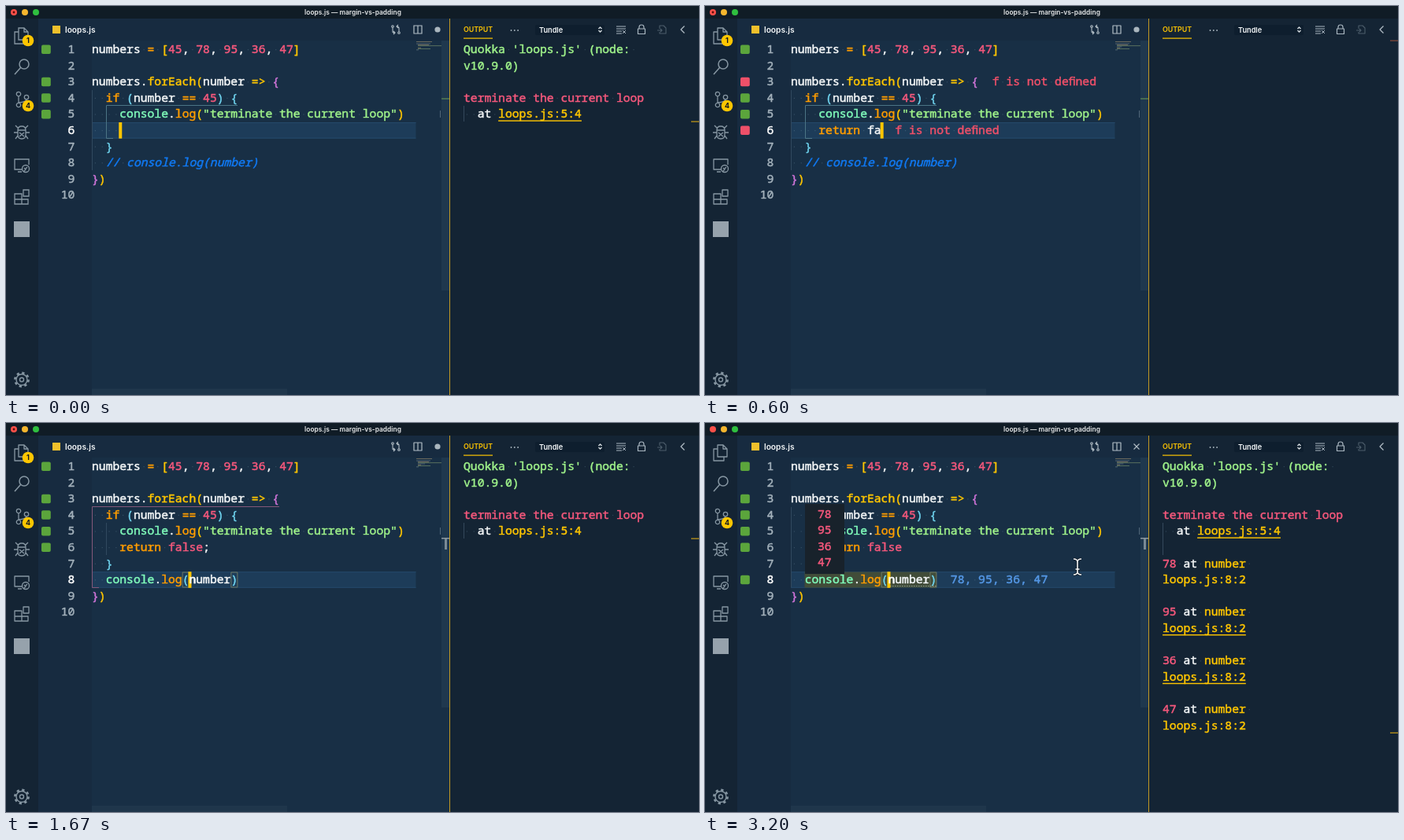
An HTML page with a canvas for the animation above (3.3 s loop, 880 px wide and 495 px high).

```html
<!DOCTYPE html>
<html lang="en">
<head>
<meta charset="utf-8">
<title>Editor session</title>
<style>
html, body { margin: 0; width: 100%; height: 100%; overflow: hidden; background: #142434; }
canvas { display: block; width: 880px; height: 495px; }
</style>
</head>
<body>
<canvas id="stage" width="880" height="495"></canvas>
<script>
const ctx = document.getElementById('stage').getContext('2d');
const LOOP = 3300, ADV = 8.82, ROW = 20.6, CODE_X = 109, OUT_X = 581;
const MONO = '"Noto Sans Mono", "DejaVu Sans Mono", monospace', SANS = 'Inter, Roboto, sans-serif';
const C = {
  w: '#f4f7f8', y: '#ffc600', o: '#ff9d00', p: '#f5587c', g: '#9ff28a', m: '#80fcbb',
  c: '#6fd3ee', v: '#cf74d8', b: '#1079f2', i: '#5598e6', e: '#ee5069',
  icon: '#8797a3', green: '#5ba53c', editor: '#182f45', panel: '#142434', popup: '#17222c'
};
const rowY = n => 55 + ROW * (n - 1);
const colX = n => CODE_X + ADV * n;

function rect(x, y, w, h, color) {
  ctx.fillStyle = color;
  ctx.fillRect(x, y, w, h);
}
function round(x, y, w, h, r, color) {
  ctx.fillStyle = color;
  ctx.beginPath();
  ctx.roundRect(x, y, w, h, r);
  ctx.fill();
}
function disc(x, y, r, color) {
  round(x - r, y - r, 2 * r, 2 * r, r, color);
}
function text(s, x, y, color, font, align = 'left') {
  ctx.font = font;
  ctx.textAlign = align;
  ctx.textBaseline = 'alphabetic';
  ctx.fillStyle = color;
  ctx.fillText(s, x, y);
}
// Monospaced text with a fine outline for a semibold weight.
function mono(s, x, y, color, { size = 14.7, style = '', align = 'left', weight = .5 } = {}) {
  text(s, x, y, color, `${style} 500 ${size}px ${MONO}`, align);
  ctx.strokeStyle = color;
  ctx.lineWidth = weight;
  ctx.lineJoin = 'round';
  ctx.strokeText(s, x, y);
}
function stroke(x, y, path, color = C.icon, width = 1.3, dash = []) {
  ctx.save();
  ctx.translate(x, y);
  ctx.strokeStyle = color;
  ctx.lineWidth = width;
  ctx.setLineDash(dash);
  ctx.stroke(new Path2D(path));
  ctx.restore();
}
const ring = (x, y, r) => `M${x + r} ${y}a${r} ${r} 0 1 1 ${-2 * r} 0a${r} ${r} 0 1 1 ${2 * r} 0`;

// Draws [colour key, text, ...] on the character grid, with faint dots for spaces.
function code(x, y, parts, style = '') {
  for (let k = 0; k < parts.length; k += 2) {
    const s = parts[k + 1];
    mono(s, x, y + 5, C[parts[k]], { style });
    [...s].forEach((ch, n) => {
      if (ch === ' ') rect(x + (n + .5) * ADV - .6, y, 1.2, 1.2, 'rgba(150,185,205,.22)');
    });
    x += s.length * ADV;
  }
}
const line = (row, parts, style) => code(CODE_X, rowY(row), parts, style);

// Line 6 as it is typed.
const TYPED = [[0, ''], [70, 'r'], [270, 're'], [330, 'ret'], [400, 'retur'], [470, 'return'],
  [530, 'return f'], [600, 'return fa'], [670, 'return fal'], [730, 'return fals'],
  [800, 'return false'], [1130, 'return false;'], [1870, 'return false']];

function stateAt(t) {
  const typed = TYPED.findLast(([start]) => t >= start)[1];
  const row = t < 1200 ? 6 : t < 1270 ? 7 : 8;
  return {
    t, typed, row,
    col: row === 6 ? 4 + typed.length : row === 7 ? 3 : t < 1670 ? 17 : 14,
    error: t < 200 ? '' : t < 470 ? 'r' : t < 530 ? '' : t < 930 ? 'f' : '',
    uncommented: t >= 1670,
    saved: t >= 1870,
    values: Math.max(0, Math.min(4, Math.floor((t - 1865) / 66))),
    outer: t >= 1330,
    hover: t >= 2930
  };
}

function drawChrome(s) {
  rect(0, 0, 880, 495, C.panel);
  rect(41, 16, 522, 479, '#172b40');
  rect(109, 44, 454, 451, C.editor);
  rect(0, 0, 880, 16, '#101c26');
  ['#fb5049', '#f5b62e', '#2fbf3f'].forEach((c, k) => disc(10 + 14 * k, 8, 4, c));
  if (!s.saved) disc(10, 8, 1.4, '#5c0d0a');
  text('loops.js — margin-vs-padding', 440.5, 11.2, '#e6e8e9', `600 8.4px ${SANS}`, 'center');
  rect(59, 25, 10, 10, '#f0c02c');
  text('loops.js', 75, 34, C.w, `600 10.2px ${SANS}`);

  stroke(495, 30, 'M-4 -3V3M4 3V-2Q4 -4 1 -4M3 -6L1 -4L3 -2M-4 3Q-4 4 -1 4M-3 2L-1 4L-3 6' + ring(-4, -4, 1.3) + ring(4, 4, 1.3), '#b2bec6', 1.1);
  stroke(523, 30, 'M-5 -5H5V5H-5ZM0 -5V5', '#b2bec6', 1.2);
  if (s.saved) stroke(548, 30, 'M-3.5 -3.5L3.5 3.5M3.5 -3.5L-3.5 3.5', '#b2bec6', 1.1);
  else disc(548, 30, 3.6, '#aab6be');

  stroke(20, 38, 'M-4 -10H3L8 -5V5H-4ZM3 -10V-5H8M-4 -5H-9V10H4V5');
  stroke(20, 77, ring(3, -3, 6) + 'M-1.5 1.5L-9 10', C.icon, 1.5);
  stroke(20, 119, ring(-4, -7, 2.7) + ring(-4, 7, 2.7) + ring(6, -3, 2.7) + 'M-4 -4V4M6 0Q6 3 -4 4');
  stroke(20, 161, 'M-5 -3Q-5 -8 0 -8T5 -3V3Q5 8 0 8T-5 3ZM-5 -3H5M-4 -5L-8 -9M4 -5L8 -9M-5 0H-10M5 0H10M-5 4L-8 8M5 4L8 8M-3 0L3 5M3 0L-3 5');
  stroke(20, 203, 'M0 5H-9V-8H9V-1M-5 8H0' + ring(5, 4, 4.5) + 'M3 3L5 5L3 7M7 2L5 4');
  stroke(20, 243, 'M-9 -4H0V9H-9ZM-9 3H8V9H0M0 3H8M2 -9H9V-1H2Z');
  rect(10, 274, 20, 20, '#96a2ac');
  stroke(20, 475.5, ring(0, 0, 7) + ring(0, 0, 2.5), C.icon, 1.4);
  stroke(20, 475.5, ring(0, 0, 8.6), C.icon, 2.6, [3.2, 3.555]);
  const badge = (y, n) => {
    disc(28, y, 7.3, C.y);
    text(n, 28, y + 3.2, '#101820', `700 9px ${SANS}`, 'center');
  };
  if (!s.saved) badge(44, '1');
  badge(127, '4');

  rect(553, 44, 10, 318, '#1f384e');
  rect(109, 487, 248, 8, '#1f364b');
  [20, 0, 18, 14, 30, s.typed.length * .7, 4, 16, 3].forEach((w, k) => {
    if (w) rect(521 + (k > 2 && k < 8 ? 2 : 0), 45 + k * 1.3, w, .9, ['#75705f', '#5e7761', '#586a76'][k % 3]);
  });
  if (s.outer) {
    rect(553, 146, 10, 1.5, '#8f9aa2');
    rect(557, 147, 3, 14, '#7a8a95');
  } else rect(553, 117.5, 10, 1, '#6f9f58');
  rect(551, 133, 1, 9, '#52687a');
}

function drawEditor(s) {
  const top = rowY(s.row) - 10;
  rect(109, top, 411.5, ROW, '#1d3c59');
  rect(109, top, 411.5, 1, '#25496a');
  rect(109, top + ROW - 1, 411.5, 1, '#25496a');
  if (s.hover) rect(126.5, 189.5, 167.5, 20, '#414c39');

  // Indent guides and the active bracket scope.
  rect(109, 107, 1, 102, '#31495f');
  rect(127, 127, 1, 41, '#31495f');
  if (!s.outer) stroke(0, 0, 'M294 126.5H127.5V168.5H136', '#4c7585', 1);
  else if (!s.saved) stroke(0, 0, 'M347 106.5H109.5V209.5H118', '#85587a', 1);

  for (let n = 1; n <= 10; n++) {
    mono(n, 87.3, rowY(n) + 5, n === s.row ? '#fff' : '#a3b1bb', { align: 'right' });
    const marked = [1, 3, 4, 5].includes(n) || n === 6 && s.t >= 200 && s.typed || n === 8 && s.t >= 1730;
    if (marked) round(45, rowY(n) - 5.5, 11.8, 11.5, 2, s.error && (n === 3 || n === 6) ? C.e : C.green);
  }

  line(1, ['w', 'numbers ', 'o', '= ', 'y', '[', 'p', '45', 'w', ', ', 'p', '78', 'w', ', ',
    'p', '95', 'w', ', ', 'p', '36', 'w', ', ', 'p', '47', 'y', ']']);
  line(3, ['w', 'numbers.', 'y', 'forEach(', 'w', 'number ', 'y', '=> ', 'v', '{']);
  line(4, ['w', '  ', 'o', 'if ', 'c', '(', 'w', 'number ', 'o', '== ', 'p', '45', 'c', ') {']);
  line(5, ['w', '    ', 'm', 'console', 'w', '.', 'o', 'log', 'y', '(', 'g', '"terminate the current loop"', 'y', ')']);
  const [word, arg = ''] = s.typed.split(' ');
  const done = arg.startsWith('false');
  line(6, ['w', '    ', word === 'return' ? 'o' : 'w', word + (arg && ' '),
    done ? 'p' : 'w', arg.replace(';', ''), 'w', arg.endsWith(';') ? ';' : '']);
  line(7, ['w', '  ', 'c', '}']);
  line(9, ['v', '}', 'y', ')']);
  if (s.uncommented) {
    line(8, ['w', '  ', 'm', 'console', 'w', '.', 'o', 'log', 'c', '(', 'w', 'number', 'c', ')']);
    for (const c of [13, 20]) stroke(colX(c), 189.5, 'M.5 .5H8.5V19.5H.5Z', '#6e7963', 1);
    if (s.saved) stroke(0, 0, 'M232 207.5H294', '#8ba093', 1, [1.5, 1.5]);
  } else line(8, ['w', '  ', 'b', '// console.log(number)'], 'italic');

  if (s.error) {
    // The fi ligature fills a single cell.
    const message = s.error + ' is not de\uFB01ned';
    code(colX(29), rowY(3), ['e', message]);
    code(colX(6 + s.typed.length), rowY(6), ['e', message]);
  }
  if (s.values) code(colX(23), rowY(8), ['i', [78, 95, 36, 47].slice(0, s.values).join(', ')]);
  rect(colX(s.col) - 1, top, 4, ROW, C.y);
  if (s.row === 8 && s.uncommented) code(colX(14), rowY(8), ['w', 'n']);
}

function drawOutput(s) {
  rect(563, 16, 1, 479, '#c29a24');
  text('OUTPUT', 581, 33.3, C.y, `600 8.8px ${SANS}`);
  rect(581, 40.5, 37, 1.2, C.y);
  for (let k = 0; k < 3; k++) disc(641.5 + k * 4.3, 31, .9, '#aebac3');
  round(672, 24, 88, 13, 2, '#0e1e2e');
  text('Tundle', 677, 33.5, C.w, `600 9.2px ${SANS}`);
  stroke(754.5, 30, 'M-2 -1L0 -3L2 -1M-2 1L0 3L2 1', '#dce2e6', 1.3);
  stroke(781, 30, 'M-6 -4H6M-6 -1H6M-6 2H1M-6 5H1M2 1L6 5M6 1L2 5', '#a9b6c0', 1);
  stroke(807, 30, 'M-4.5 -1H4.5V5.5H-4.5ZM-3 -1V-3Q-3 -6 0 -6T3 -3V-1', '#a9b6c0', 1.2);
  stroke(833, 30, 'M-3 -1V-5H2L5 -2V5H-3V3M-6 1H0M-2 -1L0 1L-2 3', '#4c5d6b', 1.1);
  stroke(859, 30, 'M2.5 -4.5L-2 0L2.5 4.5', '#b3bfc8', 1.2);

  const cleared = s.t >= 530 && s.t < 1000;
  const rows = cleared ? 0 : 5 + 3 * s.values;
  rect(870, 43.5 + rows * ROW, 10, 1.2, cleared ? '#8a4b3a' : '#c99d17');
  if (cleared) return;

  const out = (row, parts) => code(OUT_X, rowY(row), parts);
  const underline = (row, col, n) => rect(OUT_X + col * ADV, rowY(row) + 8, n * ADV, 1.4, C.y);
  const linked = s.t < 530 || s.t >= 2330;
  out(1, ['g', "Quokka 'loops.js' (node: "]);
  out(2, ['g', 'v10.9.0)']);
  out(4, ['p', 'terminate the current loop']);
  rect(OUT_X, 127, 1, s.values ? 41 : 20, '#34495b');
  out(5, ['w', '  at ', 'y', 'loops.js:5:4']);
  if (linked) underline(5, 5, 12);
  [78, 95, 36, 47].slice(0, s.values).forEach((n, k) => {
    out(7 + 3 * k, ['p', String(n), 'w', ' at ', 'y', 'number ']);
    out(8 + 3 * k, ['y', 'loops.js:8:2']);
    if (linked && (k === 1 || k === 2)) underline(8 + 3 * k, 0, 12);
  });
}

function drawSuggestions(s) {
  if (s.t < 130 || s.t >= 470) return;
  const full = s.t < 330;
  const items = full ? ['releaseEvents', 'removeEventListener', 'requestAnimationFrame', 'resizeBy', 'resizeTo',
    'return', 'ri:a', 'ri:art', 'ri:d', 'ri:dpr', 'ri:t', 'ri:type'] : ['return'];
  const typed = full ? 1 : s.typed.length, small = { size: 14, weight: .25 };
  rect(161.5, 169, 272.5, items.length * ROW, C.popup);
  rect(161.5, 169, 272.5, ROW, '#1b344a');
  items.forEach((item, k) => {
    const y = 179.3 + k * ROW;
    if (item === 'return') stroke(173, y, 'M-5 -4H-1M1 -4H5M-5 -1H5M-5 2H0M2 2H5M-5 5H3', '#bcc5cb', 1.2);
    else if (item[2] === ':')
      stroke(173, y, 'M-5 5L1 -1M0 -3Q1 -6 4 -5L2 -3L3 -1L5 -3Q6 1 2 1L-4 6Q-6 6 -5 4Z', '#b6c0c7', 1);
    else stroke(173, y, 'M0 -5L4.5 -2.7V2.7L0 5L-4.5 2.7V-2.7ZM-4.5 -2.7L0 0L4.5 -2.7M0 0V5', '#a78bd4', 1.1);
    text(item.slice(0, typed), 182.5, y + 5, C.y, `700 14px ${MONO}`);
    mono(item.slice(typed), 182.5 + typed * 8.4, y + 5, '#b1bdc5', small);
  });
  if (!full) return;
  rect(434, 169, 273, 83, C.popup);
  mono('function releaseEvents(): voi', 439, 188, '#8795a0', small);
  mono('d', 439, 208.5, '#8795a0', small);
  text('@deprecated', 439, 242.5, '#bdc7cd', `italic 400 13px ${SANS}`);
  stroke(691, 180.5, 'M-3.5 -3.5L3.5 3.5M3.5 -3.5L-3.5 3.5', '#9aa7b0', 1);
}

function drawHover() {
  rect(127, 103, 50, 89, '#18222b');
  [78, 95, 36, 47].forEach((n, k) => code(143, 115.5 + k * ROW, ['p', String(n)]));
}

function drawPointer(t) {
  if (t < 2130) return;
  const step = Math.floor(t * .015 + .01) / .015;
  const mix = (a, b, start, end) => {
    const u = Math.max(0, Math.min(1, (step - start) / (end - start)));
    return a.map((v, k) => v + (b[k] - v) * u * u * (3 - 2 * u));
  };
  const [x, y] = t >= 3200 ? [473, 183]
    : t < 2600 ? mix([339, 179], [428, 203], 2330, 2600) : mix([428, 203], [386, 207], 2600, 2800);
  const beam = 'M-5 -10Q0 -10 0 -6Q0 -10 5 -10M0 -7V7M-5 10Q0 10 0 6Q0 10 5 10M-2.5 3H2.5';
  stroke(x, y, beam, '#0c1620', 3.2);
  stroke(x, y, beam, '#f5f7f8', 1.6);
}

function frame(now) {
  const s = stateAt(now % LOOP);
  drawChrome(s);
  drawEditor(s);
  drawOutput(s);
  drawSuggestions(s);
  if (s.hover) drawHover();
  drawPointer(s.t);
  requestAnimationFrame(frame);
}
requestAnimationFrame(frame);
</script>
</body>
</html>
```
